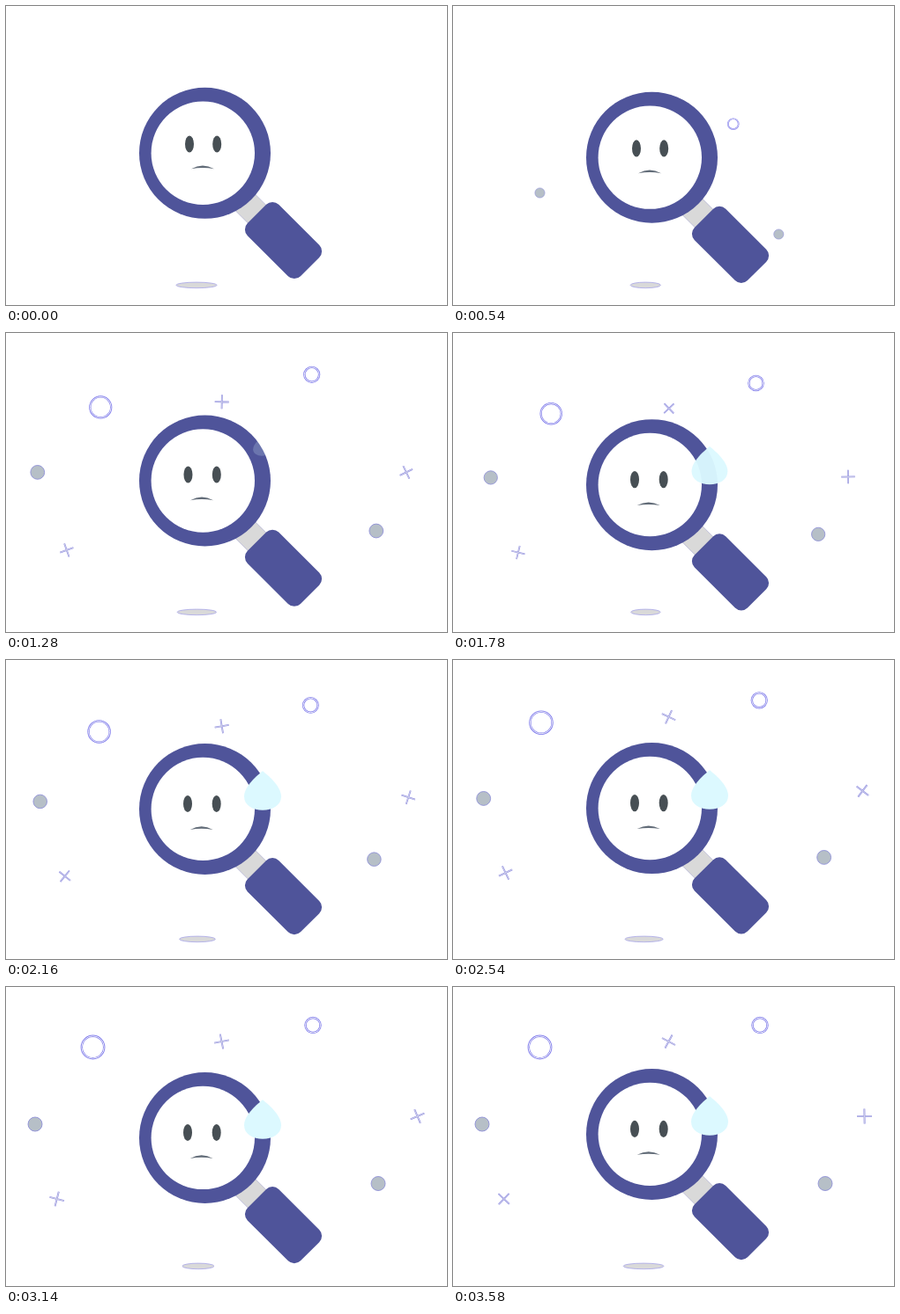
An HTML page with a canvas for the animation above (3600 ms loop, 500 by 340 pixels).

```html
<!DOCTYPE html>
<html lang="en">
<head>
<meta charset="utf-8">
<title>Nothing found</title>
<style>
  html, body { margin: 0; width: 100%; height: 100%; overflow: hidden; background: #fff; }
  canvas { display: block; }
</style>
</head>
<body>
<canvas id="stage" width="500" height="340"></canvas>
<script>
const ctx = document.getElementById('stage').getContext('2d');
const LOOP = 3600, TAU = Math.PI * 2;
const PURPLE = '#4f549a', EDGE = '#7f7bee', GREY = '#d9d9d9', INK = '#474f54';
const ORIGIN = { x: 248.5, y: 342 };   // the confetti bursts from here

const progress = (t, from, to) => Math.min(1, Math.max(0, (t - from) / (to - from)));
const mix = (a, b, p) => a + (b - a) * p;

// Piecewise linear value through [time, value] keys.
function track(t, keys) {
  let value = keys[0][1];
  for (let i = 1; i < keys.length; i++) {
    const [t0, v0] = keys[i - 1], [t1, v1] = keys[i];
    if (t >= t0) value = mix(v0, v1, progress(t, t0, t1));
  }
  return value;
}

function ellipse(x, y, rx, ry, fill) {
  ctx.beginPath();
  ctx.ellipse(x, y, rx, ry, 0, 0, TAU);
  if (fill) {
    ctx.fillStyle = fill;
    ctx.fill();
  }
}

function stroke(color, width) {
  ctx.strokeStyle = color;
  ctx.lineWidth = width;
  ctx.stroke();
}

function at(x, y, draw) {
  ctx.save();
  ctx.translate(x, y);
  draw();
  ctx.restore();
}

function dot(x, y) {
  ellipse(x, y, 8, 8, '#b6bfc7');
  stroke('#8f90d8', 0.9);
}

function ring(x, y, r) {
  ellipse(x, y, r, r);
  stroke(EDGE, 2.4);
  stroke('#eeeef6', 1);
}

function cross(x, y, degrees) {
  at(x, y, () => {
    ctx.rotate(degrees * Math.PI / 180);
    ctx.beginPath();
    ctx.moveTo(-8.5, 0);
    ctx.lineTo(8.5, 0);
    ctx.moveTo(0, -8.5);
    ctx.lineTo(0, 8.5);
    stroke('#8f8ce6', 1.9);
    stroke('#d8dae6', 0.8);
  });
}

function burst(scale, draw) {
  at(ORIGIN.x, ORIGIN.y, () => {
    ctx.scale(scale, scale);
    ctx.translate(-ORIGIN.x, -ORIGIN.y);
    draw();
  });
}

function confetti(t) {
  const left = t - LOOP;
  if (t > 450) {
    burst(track(t, [[0, 0.08], [900, 1.105], [1440, 0.938], [2700, 1]]), () => {
      dot(33, 156);
      dot(422, 223.5);
      ring(348, 43.5, 8.5);
    });
  }
  if (t > 620) {
    burst(track(t, [[0, 0], [900, 1.105], [1425, 0.88], [2640, 1]]), () => {
      ring(98.5, 68.5, 12.7);
      cross(244.5, 62, 30 + left * 0.09);
      cross(466.5, 147, left * 0.05);
      cross(57.7, 241, 45 + left / 15);
    });
  }
}

function handle() {
  at(314.5, 266.5, () => {
    ctx.rotate(Math.PI / 4);
    ctx.beginPath();
    ctx.rect(-68, -14.5, 30, 29);
    ctx.fillStyle = GREY;
    ctx.fill();
    stroke('#a9a9d2', 0.6);
    ctx.beginPath();
    ctx.roundRect(-42.5, -25, 85, 50, 10);
    ctx.fillStyle = PURPLE;
    ctx.fill();
  });
}

function face(t) {
  const p = progress(t, 900, 1400);
  const eyeY = 157 + 4.3 * p;
  ellipse(208 - 2 * p, eyeY, 5, 9.6, INK);
  ellipse(239.2 - 0.5 * p, eyeY, 5, 9.6, INK);
  at(223 - 1.3 * p, 183.5 + 5.5 * p, () => {
    ctx.beginPath();
    ctx.moveTo(-13, 1.7);
    ctx.quadraticCurveTo(0, -5.5, 13, 1.7);
    ctx.quadraticCurveTo(0, -0.5, -13, 1.7);
    ctx.fillStyle = '#626c78';
    ctx.fill();
  });
}

function sweat(t) {
  const p = progress(t, 1150, 1810);
  if (!p) return;
  ctx.save();
  if (p < 0.5) {                       // faint drop shows on the rim only
    ellipse(225.5, 167.3, 74.5, 74.5);
    ctx.clip();
  }
  ctx.globalAlpha = p;
  at(mix(290, 291, p), mix(116, 124, p), () => {
    const s = mix(0.35, 1, p);
    ctx.scale(s, s);
    ctx.beginPath();
    ctx.moveTo(0, 0);
    ctx.bezierCurveTo(5, 4, 21, 17, 21, 29);
    ctx.bezierCurveTo(21, 39, 11, 44.5, 0, 44.5);
    ctx.bezierCurveTo(-11, 44.5, -21, 39, -21, 29);
    ctx.bezierCurveTo(-21, 17, -5, 4, 0, 0);
    ctx.fillStyle = '#dcf9ff';
    ctx.fill();
  });
  ctx.restore();
}

function draw(t) {
  const bob = 1 - Math.abs(t % 1200 / 600 - 1);
  ctx.fillStyle = '#fff';
  ctx.fillRect(0, 0, 500, 340);

  ellipse(216 + 2.5 * bob, 317.4, 23 - 6.5 * bob, 3.3, GREY);
  stroke('#a9a6ea', 0.8);
  confetti(t);

  at(0, 5.5 * bob, () => {
    handle();
    ellipse(225.5, 167.3, 74.5, 74.5, PURPLE);
    ellipse(223.3, 167.2, 58.7, 58.7, '#fff');
    face(t);
    sweat(t);
  });
}

const start = performance.now();
function tick() {
  draw((performance.now() - start) % LOOP);
  requestAnimationFrame(tick);
}
tick();
</script>
</body>
</html>
```
